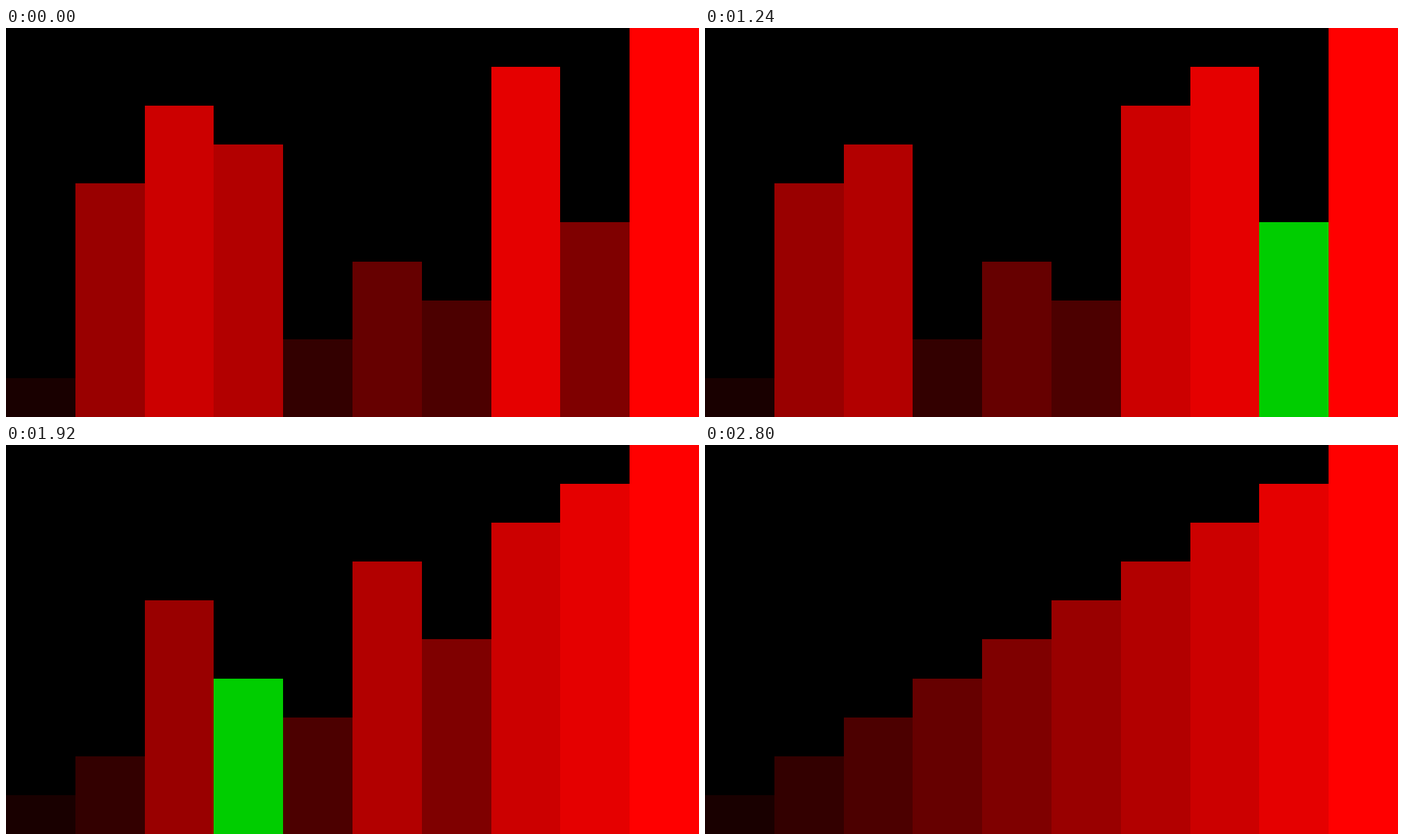
An HTML page with a canvas that plays this animation: 998x561 px, repeating every 3080 ms.

```html
<!DOCTYPE html>
<html lang="en">
<head>
<meta charset="utf-8">
<title>Bubble sort</title>
<style>
  html, body { margin: 0; overflow: hidden; background: #000; }
  canvas { display: block; }
</style>
</head>
<body>
<canvas id="stage" width="998" height="561"></canvas>
<script>
const W = 998, H = 561, LOOP = 3080, LAST_TICK = 29;
const START = [1, 6, 8, 7, 2, 4, 3, 9, 5, 10];
const COUNT = START.length;
const SWAP_AT = 0.75; // part of a comparison that passes before its swap shows
const ctx = document.getElementById('stage').getContext('2d');

// Three picture updates every 200 ms, at 0, 40 and 120 ms.
function tickAt(ms) {
  const u = ms - 800, m = u % 200;
  return u < 0 ? -1 : 3 * Math.floor(u / 200) + (m >= 40) + (m >= 120) - 1;
}

// Bubble sort carried out up to a fractional number of comparisons.
function sortUntil(progress) {
  const bars = [...START];
  let step = 0;
  for (let end = COUNT - 1; end > 0; end--) {
    for (let j = 1; j <= end; j++) {
      step++;
      if (progress >= step + SWAP_AT && bars[j - 1] > bars[j]) {
        [bars[j - 1], bars[j]] = [bars[j], bars[j - 1]];
      }
      if (progress < step + 1) return { bars, active: j };
    }
  }
  return { bars, active: -1 };
}

function stateAt(ms) {
  const tick = tickAt(ms);
  if (tick < 0) return { bars: START, active: -1 };
  if (tick >= LAST_TICK) return sortUntil(Infinity);
  return sortUntil(Math.max(1, 0.802 + 1.208 * tick));
}

function draw(ms) {
  const { bars, active } = stateAt(ms);
  ctx.fillStyle = '#000';
  ctx.fillRect(0, 0, W, H);
  bars.forEach((value, i) => {
    const left = Math.round(i * W / COUNT);
    const right = Math.round((i + 1) * W / COUNT);
    const top = Math.round(H - H * value / COUNT - 0.01);
    ctx.fillStyle = i === active ? '#00cd00' : `rgb(${Math.floor(25.5 * value)}, 0, 0)`;
    ctx.fillRect(left, top, right - left, H - top);
  });
}

const began = performance.now();
function loop() {
  draw((performance.now() - began) % LOOP);
  requestAnimationFrame(loop);
}
loop();
</script>
</body>
</html>
```
